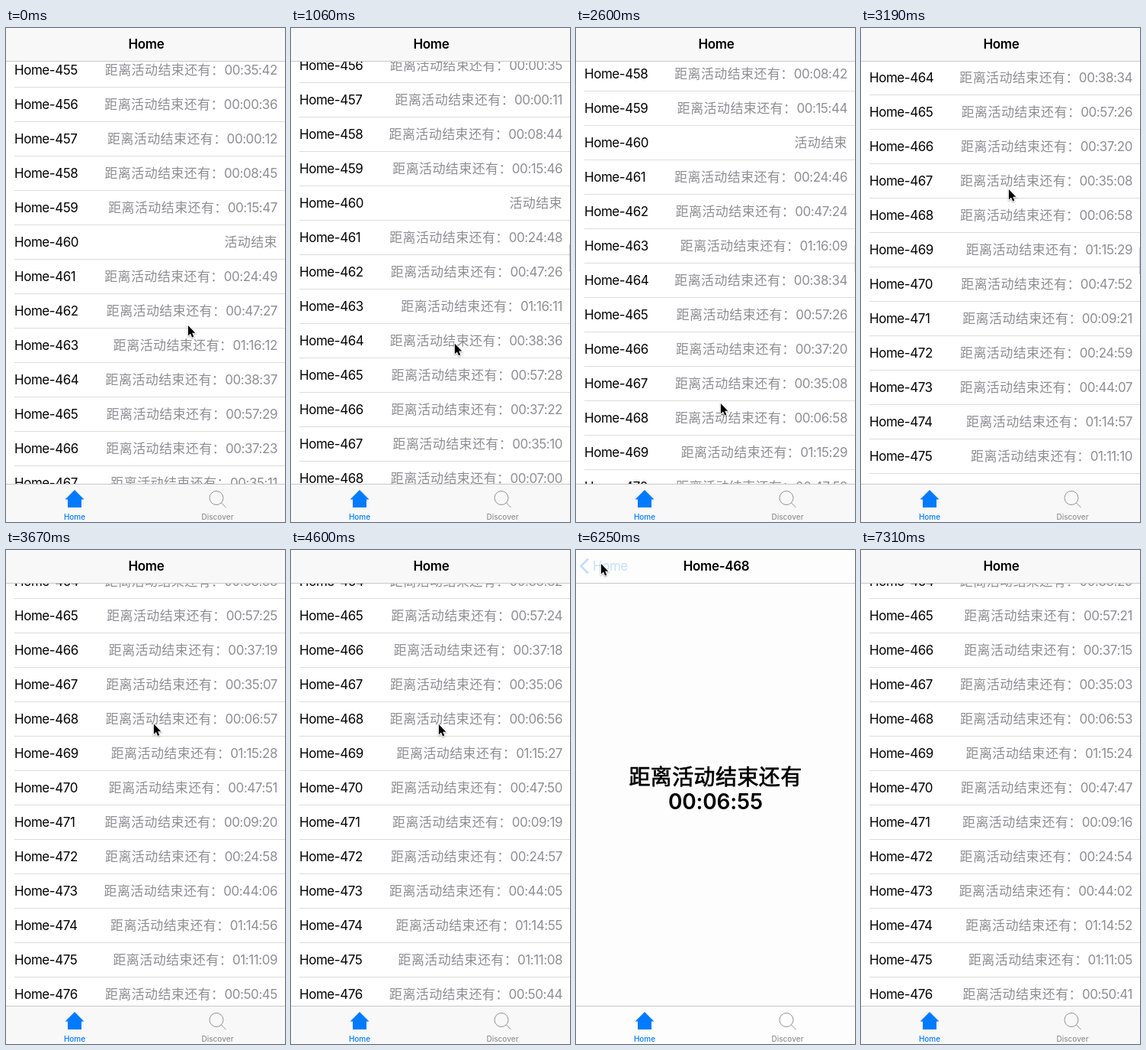
Write an HTML page with a canvas that moves like this. It is 366 by 646 pixels and loops after 7.79 s.

```html
<!DOCTYPE html>
<html lang="zh">
<head>
<meta charset="utf-8">
<title>Countdown list</title>
<style>
html, body { margin: 0; width: 100%; height: 100%; overflow: hidden; background: #fff; }
canvas { display: block; }
</style>
</head>
<body>
<canvas id="stage" width="366" height="646"></canvas>
<script>
const ctx = document.getElementById('stage').getContext('2d');
const W = 366, H = 646, LOOP = 7790, STEP = LOOP / 66;
const TOP = 43, BOTTOM = 596, ROW = 45, FIRST = 455, OPENED = 468;
const FONT = 'Inter, "Noto Sans CJK SC", "Noto Sans CJK", sans-serif';
const BLUE = '#007aff', GRAY = '#8e8e93', LINE = '#dcdcde', EDGE = '#c8c8ca';
const LABEL = '距离活动结束还有', FINISHED = '活动结束';

// Text of each row when the loop starts.
const timers = ('35:42 0:36 0:12 8:45 15:47 end 24:49 47:27 76:12 38:37 57:29 37:23 ' +
  '35:11 7:01 75:32 47:55 9:24 25:02 44:10 75:00 71:13 50:49').split(' ').map(text => {
  const [minutes, seconds] = text.split(':').map(Number);
  return minutes * 60 + seconds;
});

// Each flick of the list: time of highest speed, distance.
const flicks = [[1084, 130], [3067, 289]];

// Each move of the pointer: start, then where it ends.
const MOVE = 400;
const moves = [
  [450, 222, 472], [830, 209, 375], [1300, 189, 490], [2790, 193, 210],
  [3300, 193, 227], [5600, 32, 17], [6400, -20, 30]
];

const clamp = v => Math.min(1, Math.max(0, v));
const progress = (t, start, length) => clamp((t - start) / length);
const easeOut = u => 1 - (1 - u) ** 3;
const easeInOut = u => u * u * (3 - 2 * u);
const mix = (a, b, u) => a + (b - a) * u;

// Vertical centre of row 460.
const scrollAt = t => flicks.reduce(
  (y, [peak, distance]) => y - distance / (1 + Math.exp((peak - t) / 50)), 280);

const pointerAt = t => moves.reduce(([x, y], [start, toX, toY]) => {
  const u = easeInOut(progress(t, start, MOVE));
  return [mix(x, toX, u), mix(y, toY, u)];
}, [238, 388]);

function clock(seconds) {
  return [seconds / 3600, seconds / 60 % 60, seconds % 60]
    .map(v => String(Math.floor(v)).padStart(2, '0')).join(':');
}

function rect(x, y, w, h, color) {
  ctx.fillStyle = color;
  ctx.fillRect(x, y, w, h);
}

function stroke(path, color, width) {
  ctx.strokeStyle = color;
  ctx.lineWidth = width;
  ctx.stroke(new Path2D(path));
}

// Draws text and returns its width; outline thickens the strokes.
function text(string, x, y, { color = '#000', size = 17, weight = 400, align = 'left', spacing = -0.45, outline = 0 } = {}) {
  ctx.font = `${weight} ${size}px ${FONT}`;
  ctx.letterSpacing = spacing + 'px';
  ctx.textAlign = align;
  ctx.fillStyle = ctx.strokeStyle = color;
  ctx.fillText(string, x, y);
  if (outline) {
    ctx.lineWidth = outline;
    ctx.strokeText(string, x, y);
  }
  return ctx.measureText(string).width;
}

function drawRow(id, y, seconds) {
  rect(11, y + 22, W - 11, 1, LINE);
  text('Home-' + id, 11, y + 6);
  const value = { color: GRAY, align: 'right' };
  const words = { ...value, spacing: 0.4 };
  if (isNaN(seconds)) {
    text(FINISHED, 356, y + 6, words);
  } else {
    const width = text(clock(seconds), 356, y + 6, value);
    text(LABEL + '：', 356 - width, y + 6, words);
  }
}

function drawList(t, ticks, selected) {
  const origin = scrollAt(t);
  rect(0, TOP, W, BOTTOM - TOP, '#fff');
  timers.forEach((start, i) => {
    const id = FIRST + i;
    const y = Math.round(origin + (id - 460) * ROW);
    if (id === OPENED) rect(0, y - 23, W, ROW, `rgba(217,217,217,${selected})`);
    drawRow(id, y, start - ticks);
  });
  // The scroll bar shows around each flick.
  const shown = Math.max(...flicks.map(([peak]) => 1 - progress(Math.abs(t - peak), 250, 350)));
  rect(365, 283 + (229 - origin) / 86, 1, 35, `rgba(0,0,0,${0.22 * shown})`);
}

function drawDetail(ticks) {
  rect(0, TOP, W, BOTTOM - TOP, '#fdfdfd');
  const big = { size: 28, align: 'center' };
  text(LABEL, 183, 307, { ...big, spacing: 0.4, outline: 0.7 });
  text(clock(timers[OPENED - FIRST] - ticks), 183, 339, { ...big, weight: 600, spacing: -0.2 });
}

function drawBar(y, height, open) {
  const shade = mix(248, 253, open);
  rect(0, y, W, height, `rgb(${shade},${shade},${shade})`);
}

function drawNavBar(open, pressed) {
  drawBar(0, TOP, open);
  rect(0, TOP, W, 1, EDGE);
  const title = { weight: 600, align: 'center', spacing: -0.35 };
  ctx.globalAlpha = 1 - open;
  text('Home', mix(184, 45, open), 27, title);
  ctx.globalAlpha = open;
  text('Home-' + OPENED, mix(W, 184, open), 27, title);
  ctx.globalAlpha = open * (pressed ? 0.22 : 1);
  stroke('M16 11.5L6.5 21L16 30.5', BLUE, 2.8);
  text('Home', mix(161, 22, open), 27, { color: BLUE });
  ctx.globalAlpha = 1;
}

function drawTabBar(open) {
  drawBar(BOTTOM, H - BOTTOM, open);
  rect(0, BOTTOM, W, 1, EDGE);
  ctx.fillStyle = BLUE;
  ctx.fill(new Path2D('M90 604L102.5 616.5H99V627H81V616.5H77.5Z'));
  stroke('M285 614.5a9 9 0 1 0-18 0a9 9 0 1 0 18 0M282.5 621L288.5 627', '#929292', 1);
  const label = { size: 10, weight: 500, align: 'center', spacing: 0 };
  text('Home', 90, 642.5, { ...label, color: BLUE });
  text('Discover', 277.5, 642.5, { ...label, color: '#929292' });
}

function drawPointer(t) {
  const [x, y] = pointerAt(t);
  const arrow = new Path2D('M1 1V16L4.4 12.8L6.8 18.2L9.2 17.2L6.8 11.9H11.4Z');
  ctx.save();
  ctx.translate(x, y);
  ctx.scale(0.9, 0.9);
  ctx.shadowColor = 'rgba(0,0,0,.35)';
  ctx.shadowBlur = 2;
  ctx.shadowOffsetY = 1;
  ctx.strokeStyle = '#fff';
  ctx.lineWidth = 2;
  ctx.stroke(arrow);
  ctx.shadowColor = 'transparent';
  ctx.fillStyle = '#000';
  ctx.fill(arrow);
  ctx.restore();
}

function drawShifted(x, paint) {
  ctx.save();
  ctx.translate(Math.round(x), 0);
  paint();
  ctx.restore();
}

function draw(t) {
  const ticks = t < 470 ? 0 : Math.floor((t + 700) / 1000);
  const open = easeOut(progress(t, 4730, 500)) - easeOut(progress(t, 6290, 520));
  const selected = t < 4700 ? 0 : 1 - progress(t, 6500, 500);

  drawShifted(-0.3 * W * open, () => drawList(t, ticks, selected));
  rect(0, TOP, W, BOTTOM - TOP, `rgba(0,0,0,${0.1 * open})`);
  drawShifted(W * (1 - open), () => drawDetail(ticks));
  drawNavBar(open, t > 6200);
  drawTabBar(open);
  drawPointer(t);
}

// The picture advances in even steps.
function frame() {
  const t = performance.now() % LOOP;
  draw(Math.floor((t + 14) / STEP) % 66 * STEP);
  requestAnimationFrame(frame);
}
frame();
</script>
</body>
</html>
```
